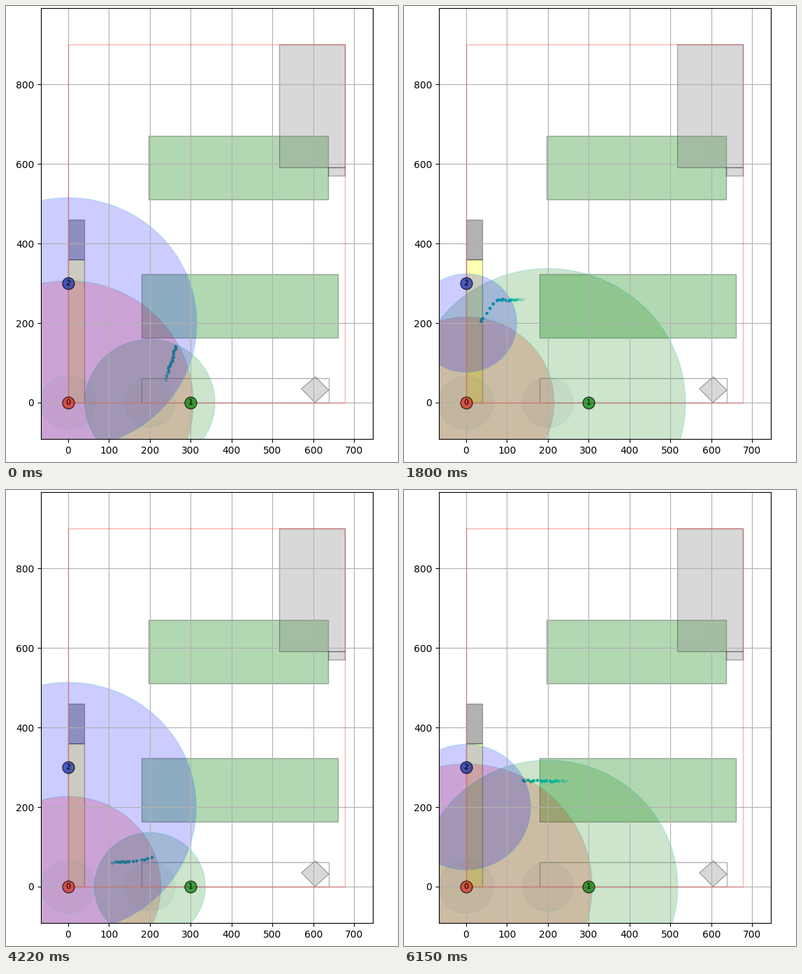
A matplotlib script for the animation above (6230 ms loop, 561 by 653 pixels).

```python
import math

import numpy as np
import matplotlib.pyplot as plt
from matplotlib.animation import FuncAnimation
from matplotlib.patches import Circle, Polygon, Rectangle

LOOP, FRAMES, TICKS = 6230, 178, 80
STEP = LOOP // FRAMES
TRAIL, PER_POSE = 19, 3
HEIGHT = 65  # of the anchors above the tag

# Tag route: pose number, x, y
ROUTE = np.array([
    (-6, 239, 54), (0, 264, 141), (6, 252, 232), (7.5, 235, 262),
    (10, 155, 258), (15, 74, 257), (16.5, 38, 210), (22, 38, 118),
    (28, 53, 70), (30, 72, 60), (37, 150, 62), (41, 260, 82),
    (44, 264, 145), (49, 263, 227), (51, 245, 264), (57, 140, 267)]).T

rng = np.random.default_rng(4)
jitter = rng.normal(0, 1.2, (TICKS * PER_POSE, 2))

fig = plt.figure(figsize=(5.61, 6.53), dpi=100)
ax = fig.add_axes([50 / 561, 33 / 653, 475 / 561, 617 / 653])
ax.set(xlim=(-66.7, 745.8), ylim=(-91.3, 991.6))
ax.grid(True)


def zone(x, y, w, h, color):
    ax.add_patch(Rectangle((x, y), w, h, fc=color, ec="k", alpha=0.3, lw=1))


def disc(x, y, color, r=1, alpha=0.2):
    return ax.add_patch(Circle((x, y), r, fc=color, ec="c", alpha=alpha, lw=1))


def locate(pose):
    t, x, y = ROUTE
    return np.column_stack([np.interp(pose, t, x), np.interp(pose, t, y)])


zone(197, 511, 440, 160, "green")
zone(180, 163.5, 480, 160, "green")
zone(517, 591, 160, 309, "gray")
zone(637, 570, 40, 21, "gray")
zone(0, 0, 40, 360, "yellow")
zone(0, 360, 40, 100, "k")
zone(180, 0, 458, 62, "none")
ax.add_patch(Polygon([(571, 35), (605, 65), (638, 31.5), (604, 0)],
                     fc="gray", ec="k", alpha=0.3, lw=1))
ax.plot([0, 677, 677, 0, 0], [0, 0, 900, 900, 0], "r", lw=1, alpha=0.3)

dots = ax.scatter(np.zeros(TRAIL), np.zeros(TRAIL), s=11, linewidths=0)
fade = np.clip((TRAIL + 1 - np.arange(TRAIL)) / 8, 0, 1)
dots.set_facecolors([(0, 0.75, 0.75, a) for a in fade])

# Each range disc is drawn at two thirds of its anchor's coordinates
anchors = [(0, 0, "red", "#dc2d19"), (300, 0, "green", "green"),
           (0, 300, "blue", "#0d2caa")]
discs = []
for i, (x, y, color, pin) in enumerate(anchors):
    discs.append(disc(x * 2 / 3, y * 2 / 3, color))
    ax.scatter(x, y, s=150, c=pin, edgecolors="k", alpha=0.7, zorder=2.5)
    ax.text(x, y, str(i), fontsize=8, ha="center", va="center")
disc(0, 0, "gray", 67, 0.1)
disc(200, 0, "gray", 62, 0.1)


def update(k):
    tick = min(int((k + 1) * STEP * TICKS / LOOP), TICKS - 1)
    pose = tick - math.ceil((tick - 2.75) / 3.47)  # skips every 3.47th tick
    tag = locate([pose])[0]
    for circle, (x, y, *_) in zip(discs, anchors):
        circle.set_radius(math.hypot(tag[0] - x, tag[1] - y, HEIGHT))
    n = PER_POSE * pose - np.arange(TRAIL)
    dots.set_offsets(locate(n / PER_POSE) + jitter[n + TRAIL])
    return [dots, *discs]


anim = FuncAnimation(fig, update, frames=FRAMES, init_func=lambda: update(0),
                     interval=STEP, repeat=True, repeat_delay=0)
plt.show()
```
